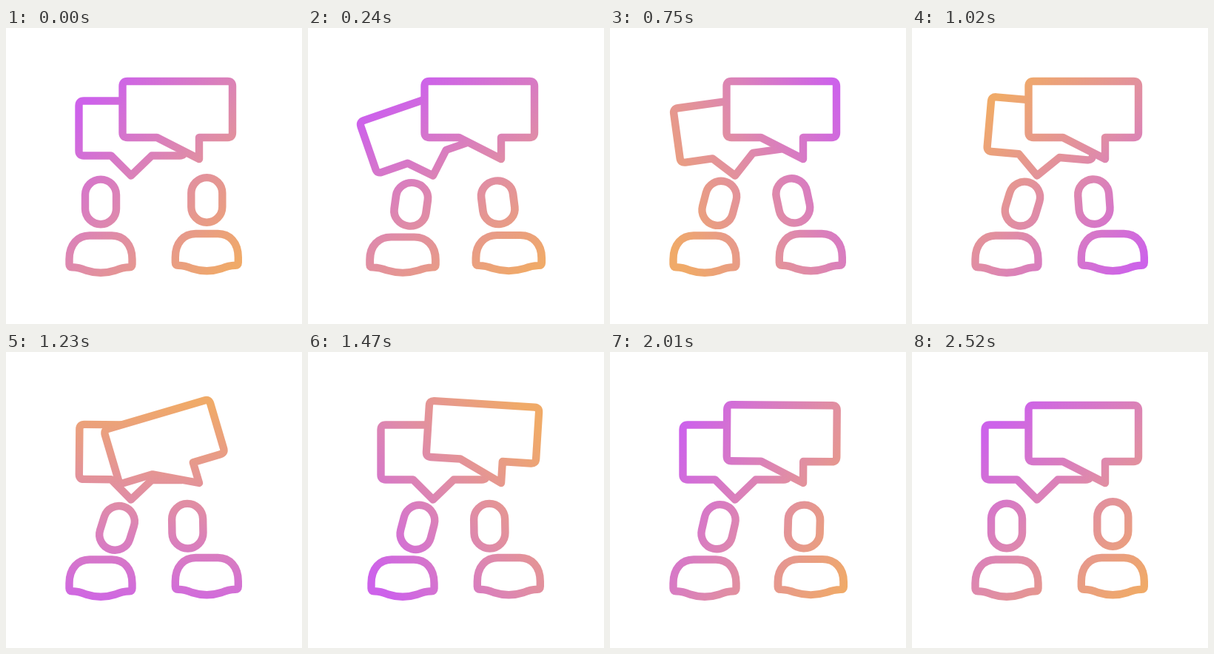
Recreate the animation shown at these times as an HTML page. Size 400 by 400 pixels, loop 4.55 s.

```html
<!DOCTYPE html>
<html lang="en">
<head>
<meta charset="utf-8">
<title>Conversation</title>
<style>
  html, body { margin: 0; width: 100%; height: 100%; overflow: hidden; background: #fff; }
  svg { display: block; width: 100vw; height: 100vh; }
</style>
</head>
<body>
<svg viewBox="0 0 400 400">
  <defs>
    <linearGradient id="paint" gradientUnits="userSpaceOnUse">
      <stop offset="0" stop-color="#cd62ea"/>
      <stop offset=".5" stop-color="#df8ba9"/>
      <stop offset="1" stop-color="#f0aa68"/>
    </linearGradient>
    <path id="body" d="M-42.5 39V32C-42.5 12-31 0-15 0H15C31 0 42.5 12 42.5 32V39Q42.5 43 38.5 42.8C30 43 26 44.5 20 47Q0 53.5-20 47C-26 44.5-30 43-38.5 42.8Q-42.5 43-42.5 39Z"/>
    <rect id="head" x="-21" y="-30.3" width="42" height="60.6" rx="21"/>
    <mask id="lines" maskUnits="userSpaceOnUse" x="0" y="0" width="400" height="400">
      <g fill="#000" stroke="#fff" stroke-width="10.4" stroke-linejoin="round" stroke-linecap="round">
        <path id="bubbleL" d="M105 98.5H235Q241.5 98.5 241.5 105V166Q241.5 172.5 235 172.5H197L169 199.5L142 172.5H105Q98.5 172.5 98.5 166V105Q98.5 98.5 105 98.5Z"/>
        <path id="bubbleR" d="M164 72H299.5Q306 72 306 78.5V141.5Q306 148 299.5 148H261V177L204 148H164Q157.5 148 157.5 141.5V78.5Q157.5 72 164 72Z"/>
        <use id="bodyL" href="#body"/>
        <use id="bodyR" href="#body"/>
        <use id="headL" href="#head"/>
        <use id="headR" href="#head"/>
      </g>
    </mask>
  </defs>
  <rect width="400" height="400" fill="url(#paint)" mask="url(#lines)"/>
</svg>
<script>
const LOOP = 4550, END = 2520, STEP = 30;
const $ = id => document.getElementById(id);
const smooth = p => p * p * (3 - 2 * p);
const part = (t, a, b) => Math.max(0, Math.min(1, (t - a) / (b - a)));
const ramp = (t, a, b) => smooth(part(t, a, b));
const bump = (t, a, b) => Math.sin(Math.PI * part(t, a, b));

// y of cubic-bezier(.33, 0, .42, 1) at x
function spinEase(x) {
  let lo = 0, hi = 1;
  for (let i = 0; i < 24; i++) {
    const m = (lo + hi) / 2, n = 1 - m;
    if (0.99 * n * n * m + 1.26 * n * m * m + m * m * m < x) lo = m; else hi = m;
  }
  return smooth(lo);
}

// A bubble rocks on its tail: evenly spaced, shrinking swings
function swing(t) {
  const first = 185, beat = 275;
  let angle = 0, from = 0, begin = 0;
  [-23, 15, -8, 5, 0].forEach((to, i) => {
    const end = first + i * beat;
    angle += (to - from) * ramp(t, begin, end);
    from = to;
    begin = end;
  });
  return angle;
}

function drawPerson(side, x, top, dip, dx, dy, turn) {
  const foot = 50;
  $("body" + side).setAttribute("transform",
    `translate(${x} ${top + foot}) scale(${1 + 0.045 * dip} ${1 - 0.04 * dip}) translate(0 ${-foot})`);
  $("head" + side).setAttribute("transform",
    `translate(${x + dx} ${top - 45.6 + dy + 2.8 * dip}) rotate(${turn}) scale(${1 + 0.03 * dip} ${1 - 0.03 * dip})`);
}

function drawPeople(t) {
  const come = ramp(t, 0, 420), comeDip = bump(t, 0, 420);

  const backL = [2040, 2490], backR = [1740, 2190];
  const leanL = come - ramp(t, ...backL);
  const nod = ramp(t, 420, 1230) - ramp(t, 1230, 1650);
  drawPerson("L", 128, 280.5, comeDip + bump(t, ...backL),
    18.5 * leanL + 3.5 * nod, 1.3 * leanL + 1.7 * nod, 13 * leanL + 4.5 * nod);

  const leanR = come - ramp(t, ...backR), dipR = bump(t, ...backR);
  const lift = ramp(t, 750, 1170);
  drawPerson("R", 271.3, 278, comeDip + dipR,
    -(24 + 2 * lift) * leanR, (1 + 1.8 * lift) * leanR, (11 * lift - 12) * leanR + 2 * dipR);
}

function draw(time) {
  const t = Math.min(END, Math.floor((time % LOOP) / STEP) * STEP);
  const angle = (45 + 360 * spinEase(t / END)) * Math.PI / 180;
  const cx = 208, cy = 213, reach = 148;
  const vx = reach * Math.cos(angle), vy = reach * Math.sin(angle);
  const ends = { x1: cx - vx, y1: cy - vy, x2: cx + vx, y2: cy + vy };
  for (const k in ends) $("paint").setAttribute(k, ends[k]);

  $("bubbleL").setAttribute("transform", `rotate(${swing(t)} 169 199.5)`);
  $("bubbleR").setAttribute("transform", `rotate(${swing(t - 1110)} 261 177)`);
  drawPeople(t);
}

const start = performance.now();
function tick() {
  draw(performance.now() - start);
  requestAnimationFrame(tick);
}
tick();
</script>
</body>
</html>
```
